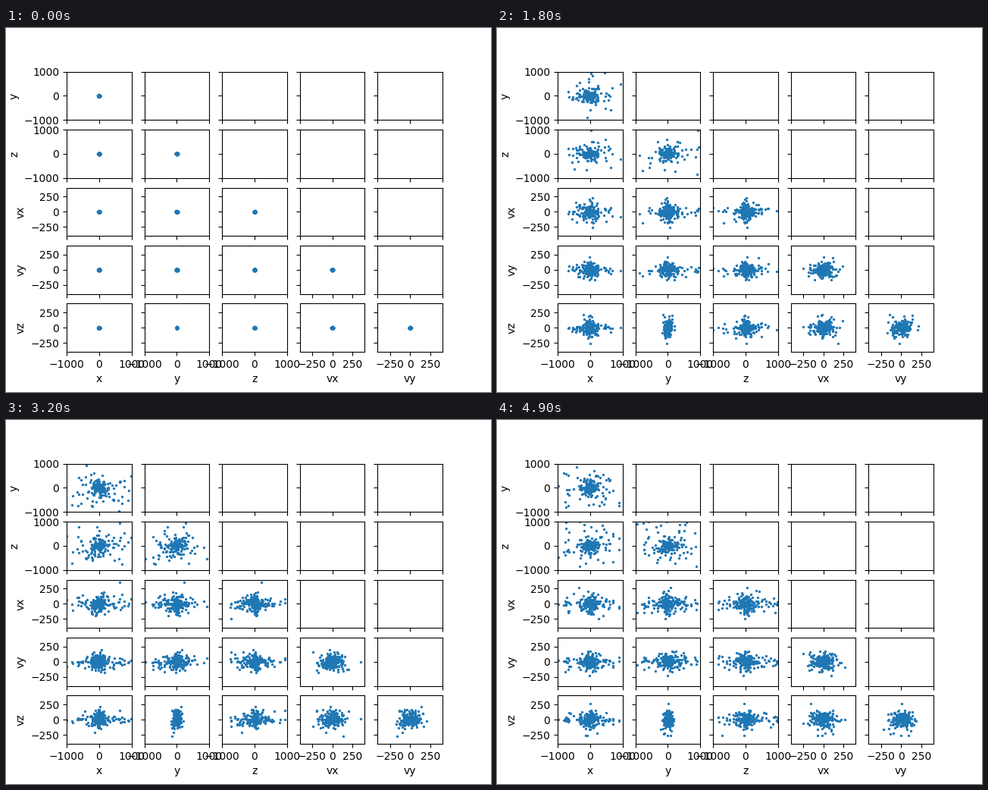
These frames come from a looping animation (640 by 480 pixels, 5 s). A matplotlib script:

```python
import numpy as np
import matplotlib.pyplot as plt
from matplotlib.animation import FuncAnimation

NAMES = ["x", "y", "z", "vx", "vy", "vz"]
FRAMES, INTERVAL = 50, 100
COUNT = 215
PULL, CORE = 2.0e4, 150.0
SUBSTEPS = 10


def gravity(pos):
    """Pull of a logarithmic halo with a soft core."""
    return -PULL * pos / ((pos ** 2).sum(axis=1, keepdims=True) + CORE ** 2)


def ball(rng, radius):
    """Random points spread evenly inside a ball."""
    way = rng.normal(size=(COUNT, 3))
    way /= np.linalg.norm(way, axis=1, keepdims=True)
    return radius * way * rng.random((COUNT, 1)) ** (1 / 3)


def simulate(steps, seed=11):
    """Phase-space states of a tight cluster that bursts and then orbits."""
    rng = np.random.default_rng(seed)
    size = (COUNT, 3)
    pos = ball(rng, 36)
    states = [np.hstack([pos, ball(rng, 14)])]

    vel = rng.normal(size=size) * [112, 104, 86]
    pos = pos + rng.normal(0, 50, size)
    dt = 1 / SUBSTEPS
    for _ in range(steps - 1):
        for _ in range(SUBSTEPS):
            vel = vel + gravity(pos) * dt / 2
            pos = pos + vel * dt
            vel = vel + gravity(pos) * dt / 2
        # close encounters in the core
        near = np.exp(-np.linalg.norm(pos, axis=1, keepdims=True) / 200)
        hard = rng.random((COUNT, 1)) < 0.03 * near
        vel = vel + rng.normal(size=size) * (12 * near + 120 * hard)
        states.append(np.hstack([pos, vel]))
    return states


def scale(i):
    """Axis limit and tick step of a quantity."""
    return (1000, 1000) if i < 3 else (400, 250)


def style(ax, row, col):
    for axis, i, set_lim in ((ax.xaxis, col, ax.set_xlim),
                             (ax.yaxis, row, ax.set_ylim)):
        limit, step = scale(i)
        axis.set_ticks([-step, 0, step])
        set_lim(-limit, limit)


states = simulate(FRAMES - 1)
fig, axes = plt.subplots(5, 5, figsize=(6.4, 4.8), dpi=100)
clouds = []

for row in range(1, 6):
    for col in range(5):
        ax = axes[row - 1, col]
        if col < row:
            # the y-vz panel shows vy against vz
            source = 4 if (row, col) == (5, 1) else col
            dots = ax.scatter(np.zeros(COUNT), np.zeros(COUNT),
                              s=2, color="C0")
            clouds.append((dots, [source, row]))
            style(ax, row, col)
        else:
            style(ax, 0, 0)
        ax.tick_params(labelbottom=row == 5, labelleft=col == 0)
        if row == 5:
            ax.set_xlabel(NAMES[col])
        if col == 0:
            ax.set_ylabel(NAMES[row])


def update(frame):
    state = states[max(frame - 1, 0)]
    for dots, pair in clouds:
        dots.set_offsets(state[:, pair])
    return [dots for dots, _ in clouds]


ani = FuncAnimation(fig, update, frames=FRAMES, interval=INTERVAL,
                    repeat=True, repeat_delay=0)
plt.show()
```
